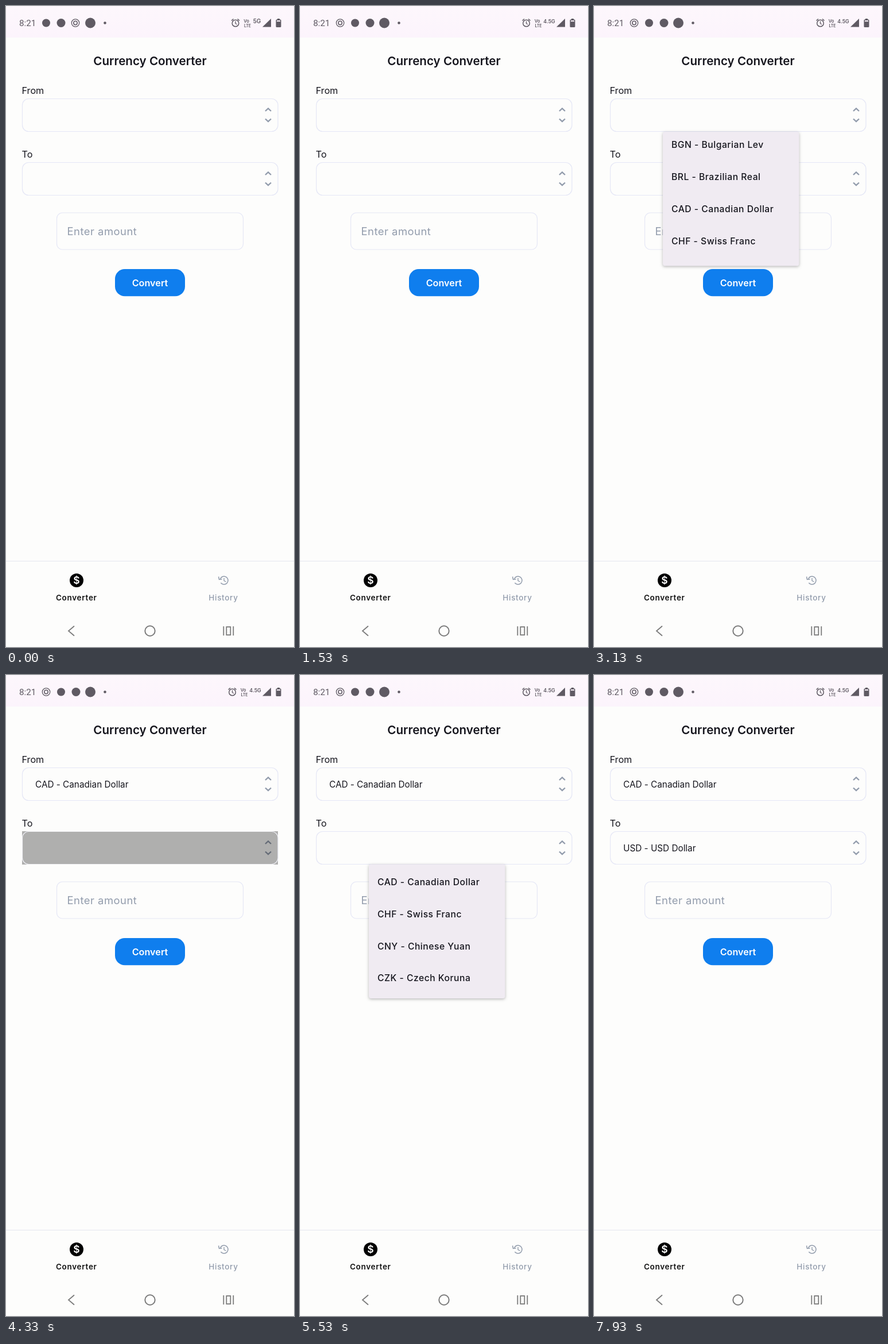
An HTML page with a canvas that plays this animation: 502x1116 px, repeating every 8000 ms.

```html
<!DOCTYPE html>
<html lang="en">
<head>
<meta charset="utf-8">
<title>Currency Converter</title>
<style>
html, body { margin: 0; width: 100%; height: 100%; overflow: hidden; background: #fdfdfc; }
canvas { display: block; width: 502px; height: 1116px; }
</style>
</head>
<body>
<canvas id="stage" width="502" height="1116"></canvas>
<script>
const ctx = document.getElementById('stage').getContext('2d');
const LOOP = 8000, TICK = 1000 / 15;
const PAGE = '#fdfdfc', INK = '#15151d', GREY = '#5f5a63', MUTED = '#929cac', EDGE = '#e5e7f6';
const SANS = 'Inter, sans-serif';
const ROW = 55.8, MENU_H = 233.5, MENU_PAD = 10;
const FROM_Y = 161.5, TO_Y = 272.5;

const currencies = [
  'AUD - Australian Dollar', 'BGN - Bulgarian Lev', 'BRL - Brazilian Real', 'CAD - Canadian Dollar',
  'CHF - Swiss Franc', 'CNY - Chinese Yuan', 'CZK - Czech Koruna', 'DKK - Danish Krone', 'EUR - Euro',
  'GBP - British Pound', 'HKD - Hong Kong Dollar', 'HUF - Hungarian Forint', 'IDR - Indonesian Rupiah',
  'ILS - Israeli Sheqel', 'INR - Indian Rupee', 'ISK - Icelandic Krona', 'JPY - Japanese Yen',
  'KRW - South Korean Won', 'MXN - Mexican Peso', 'MYR - Malaysian Ringgit', 'NOK - Norwegian Krone',
  'NZD - New Zealand Dollar', 'PHP - Philippine Peso', 'PLN - Polish Zloty', 'RON - Romanian Leu',
  'SEK - Swedish Krona', 'SGD - Singapore Dollar', 'THB - Thai Baht', 'TRY - Turkish Lira',
  'USD - USD Dollar', 'ZAR - South African Rand'
];
const SCROLL_END = currencies.length * ROW + 2 * MENU_PAD - MENU_H;

const clamp = v => Math.max(0, Math.min(1, v));
const mix = (a, b, u) => a + (b - a) * u;
const easeOut = (u, power) => 1 - Math.pow(1 - clamp(u), power);

function text(str, x, y, size, { weight = 400, color = INK, align = 'left', gap = 0, family = SANS } = {}) {
  ctx.font = `${weight} ${size}px ${family}`;
  ctx.letterSpacing = gap + 'px';
  ctx.textAlign = align;
  ctx.fillStyle = color;
  ctx.fillText(str, x, y);
}

function line(color, width, ...points) {
  ctx.strokeStyle = color;
  ctx.lineWidth = width;
  ctx.beginPath();
  points.forEach(([x, y], i) => i ? ctx.lineTo(x, y) : ctx.moveTo(x, y));
  ctx.stroke();
}

function disc(x, y, r, color) {
  ctx.fillStyle = color;
  ctx.beginPath();
  ctx.arc(x, y, r, 0, 7);
  ctx.fill();
}

function ring(x, y, r, color, width, start = 0, end = Math.PI * 2) {
  ctx.strokeStyle = color;
  ctx.lineWidth = width;
  ctx.beginPath();
  ctx.arc(x, y, r, start, end);
  ctx.stroke();
}

function box(x, y, w, h, r, fill, stroke) {
  ctx.beginPath();
  ctx.roundRect(x, y, w, h, r);
  if (fill) { ctx.fillStyle = fill; ctx.fill(); }
  if (stroke) { ctx.strokeStyle = stroke; ctx.lineWidth = 1.2; ctx.stroke(); }
}

function statusBar(k) {
  const shade = ctx.createLinearGradient(0, 0, 0, 55);
  shade.addColorStop(0, '#fdf7fc');
  shade.addColorStop(1, '#fcf4fc');
  ctx.fillStyle = shade;
  ctx.fillRect(0, 0, 502, 55);
  text('8:21', 23, 35, 15.2, { color: GREY, family: 'Roboto, sans-serif' });

  const u = k / 10, swap = clamp(u) ** 2 * (3 - 2 * clamp(u));
  disc(mix(70, 96, swap), 29.5, 7, GREY);
  disc(mix(96, 122, swap), 29.5, 7.5, GREY);
  const rx = mix(121, 70, swap);
  ring(rx, 29.5, 6.7, GREY, 1.3);
  ring(rx, 29.5, 3.2, GREY, 1.5);
  disc(147, 29.5, 9, GREY);
  disc(172.5, 29.5, 2.3, GREY);

  const late = k >= 4, dx = late ? -5.5 : 0;
  const ax = 400 + dx;
  ring(ax, 30, 5.8, GREY, 1.5);
  line(GREY, 1.3, [ax, 26.5], [ax, 30.5], [ax + 2.5, 32]);
  line(GREY, 1.6, [ax - 7, 25.5], [ax - 3.5, 22.5]);
  line(GREY, 1.6, [ax + 7, 25.5], [ax + 3.5, 22.5]);
  const small = { weight: 600, color: GREY, align: 'center' };
  text('Vo', 419 + dx, 28.5, 7.5, small);
  text('LTE', 421 + dx, 36.5, 7, small);
  text(late ? '4.5G' : '5G', late ? 434.5 : 437.5, 30, late ? 8.8 : 10, small);

  ctx.fillStyle = GREY;
  ctx.beginPath();
  ctx.moveTo(447, 36.5); ctx.lineTo(462, 36.5); ctx.lineTo(462, 22); ctx.fill();
  box(470.5, 23.5, 9, 13.5, 1.5, GREY);
  ctx.fillRect(473, 22, 4, 2);
  ctx.fillStyle = '#eee6ee';
  ctx.fillRect(472, 25, 6, 2.2);
}

function select(label, y, value, press) {
  text(label, 27.5, y - 8.5, 16.2);
  box(28.5, y, 445.5, 57, 11, null, EDGE);
  line(MUTED, 2.4, [452, y + 21.5], [457, y + 16.8], [462, y + 21.5]);
  line(MUTED, 2.4, [452, y + 35], [457, y + 39.7], [462, y + 35]);
  if (value) text(value, 51, y + 34.3, 15.3);
  if (press) {
    ctx.fillStyle = `rgba(0,0,0,${0.31 * press})`;
    ctx.fillRect(28, y - 0.5, 446, 58);
    box(28.5, y, 445.5, 57, 11, null, '#f0f0f3');
  }
}

function menu(top, alpha, scroll, scale) {
  if (alpha <= 0) return;
  ctx.save();
  ctx.globalAlpha = alpha;
  ctx.translate(238.5, top);
  ctx.scale(scale, scale);
  ctx.translate(-238.5, -top);
  ctx.shadowColor = 'rgba(0,0,0,0.28)';
  ctx.shadowBlur = 5;
  ctx.shadowOffsetY = 1.5;
  box(120, top, 237.5, MENU_H, 4, '#f0ebf2');
  ctx.shadowColor = 'transparent';
  ctx.clip();
  currencies.forEach((name, i) => {
    const y = top + MENU_PAD + ROW * (i + 0.5) - scroll;
    if (y > top - 20 && y < top + MENU_H + 20) text(name, 135, y + 5.6, 15.7, { weight: 500, gap: 0.5 });
  });
  ctx.restore();
}

function tabs() {
  line('#e4e6ef', 1.2, [0, 966.5], [502, 966.5]);
  disc(123, 1000, 12, '#000');
  text('$', 123, 1006.3, 17.5, { weight: 600, color: '#fff', align: 'center' });
  text('Converter', 122.8, 1034.5, 13.5, { weight: 600, color: '#111', align: 'center', gap: 0.7 });

  ring(380, 1000, 7, MUTED, 1.5, -2.9, 2.5);
  line(MUTED, 1.5, [370.5, 993.5], [371.5, 998.5], [376.5, 998]);
  line(MUTED, 1.4, [380, 996], [380, 1000.5], [383.5, 1002.5]);
  text('History', 379, 1034.5, 13.5, { weight: 500, color: MUTED, align: 'center', gap: 0.7 });

  const nav = '#7b7b7b';
  line(nav, 1.8, [119, 1079.5], [109, 1088], [119, 1096.5]);
  ring(251, 1088, 8.7, nav, 2);
  line(nav, 1.8, [379.3, 1080], [379.3, 1096]);
  line(nav, 1.8, [396.3, 1080], [396.3, 1096]);
  ctx.strokeRect(384.3, 1081, 7, 14);
}

// Opacity of a menu that appears and vanishes over three ticks each.
function menuState(k, open, close) {
  const shown = clamp((k - open + 1) / 3);
  const hidden = clamp((k - close + 1) / 3);
  return { alpha: shown * (1 - hidden), scale: mix(0.85, 1, shown) };
}

function draw(t) {
  const k = Math.floor((t + 4) / TICK);
  ctx.fillStyle = PAGE;
  ctx.fillRect(0, 0, 502, 1116);
  ctx.lineCap = 'butt';
  statusBar(k);
  text('Currency Converter', 251, 102.7, 20.6, { weight: 600, align: 'center' });

  const pressFrom = { 20: 1, 21: 1, 22: 0.5 }[k];
  const pressTo = { 65: 1, 66: 0.7, 67: 0.35 }[k];
  select('From', FROM_Y, k >= 53 && currencies[3], pressFrom);
  select('To', TO_Y, k >= 98 && currencies[29], pressTo);

  box(88.5, 360, 325, 64, 10, null, EDGE);
  text('Enter amount', 106.5, 398.5, 18.4, { color: MUTED, gap: 0.5 });
  box(190, 458, 122, 47.3, 17, '#0f7eee');
  text('Convert', 251, 487.5, 16.2, { weight: 600, color: '#fff', align: 'center' });
  tabs();

  const first = menuState(k, 26, 53);
  menu(219, first.alpha, 71 * easeOut((k - 42) / 5, 2), first.scale);
  const second = menuState(k, 70, 98);
  const scroll = k < 83 ? 0 : mix(174.5, SCROLL_END, easeOut((k - 83) / 8, 1.5));
  menu(329.5, second.alpha, scroll, second.scale);
}

const start = performance.now();
function frame() {
  draw((performance.now() - start) % LOOP);
  requestAnimationFrame(frame);
}
frame();
</script>
</body>
</html>
```
